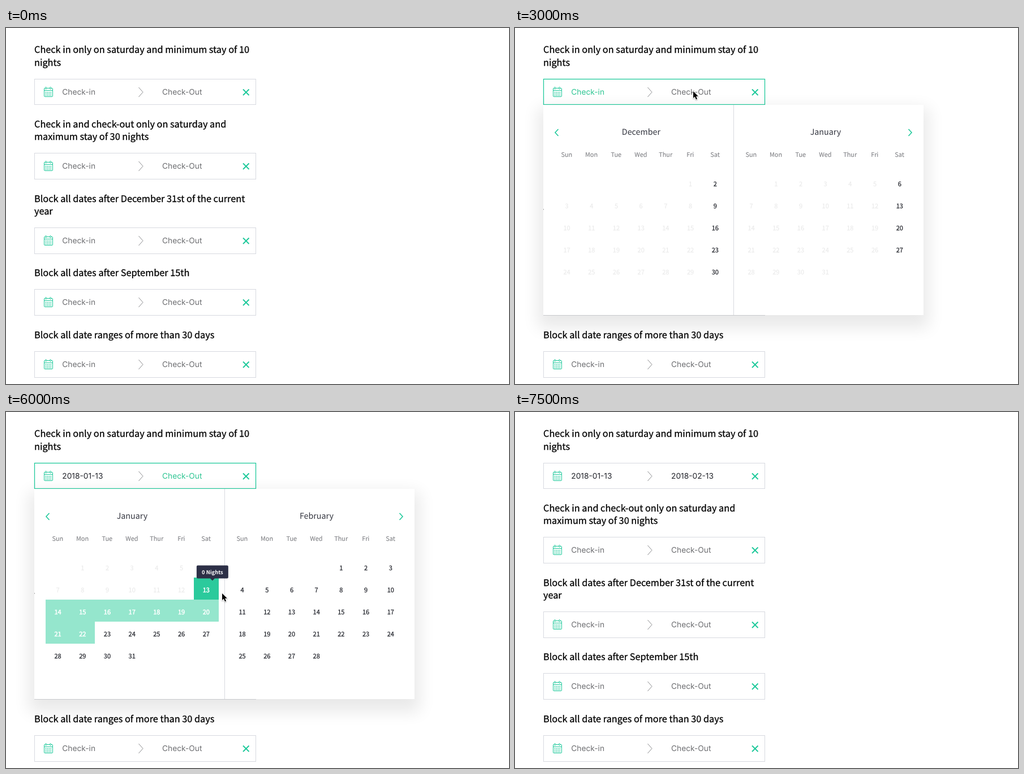
Write an HTML page with a canvas that moves like this. It is 889 px wide and 630 px high and loops after 9 s.

```html
<!DOCTYPE html>
<html lang="en">
<head>
<meta charset="utf-8">
<title>Date range picker</title>
<style>
  html, body { margin: 0; width: 100%; height: 100%; overflow: hidden; background: #fff; }
  canvas { display: block; }
</style>
</head>
<body>
<canvas id="stage" width="889" height="630"></canvas>
<script>
const ctx = document.getElementById('stage').getContext('2d');
ctx.textRendering = 'geometricPrecision';

const LOOP = 9000;
const OPEN = 3000, NEXT_MONTH = 4250, PICK_IN = 5500, HOVER_12 = 6250, HOVER_13 = 6500, CLOSE = 7250, CURSOR_END = 7500;

const SANS = '"Noto Sans CJK JP", "Noto Sans CJK SC", "Noto Sans CJK", "Open Sans", sans-serif';
const UI = 'Inter, Roboto, sans-serif';
const GREEN = '#1fc99b', GREEN_TEXT = '#2dc592', RANGE = '#95e6cd', SELECTED = '#2bca9c';
const INK = '#23252c', NAVY = '#2d3047', LINE = '#d7d9e0', GREY = '#6c6d70', FAINT = '#ebebeb';

const FIELDS = [
  { top: 90, title: ['Check in only on saturday and minimum stay of 10', 'nights'] },
  { top: 221, title: ['Check in and check-out only on saturday and', 'maximum stay of 30 nights'] },
  { top: 353, title: ['Block all dates after December 31st of the current', 'year'] },
  { top: 462, title: ['Block all dates after September 15th'] },
  { top: 572, title: ['Block all date ranges of more than 30 days'] }
];

const WEEKDAYS = ['Sun', 'Mon', 'Tue', 'Wed', 'Thur', 'Fri', 'Sat'];
// first: weekday of day 1, base: day count since the start of January
const DEC = { name: 'December', first: 5, days: 31, base: -31 };
const JAN = { name: 'January', first: 1, days: 31, base: 0 };
const FEB = { name: 'February', first: 4, days: 28, base: 31 };
const CHECK_IN = 13, MIN_STAY = 10;
const CELL_W = 43.7, CELL_H = 39, GRID_TOP = 254;

// [time, x, y] of the pointer tip
const POINTER = [
  [1250, 413, 49], [1500, 378, 134], [1750, 377, 183], [2250, 371, 180],
  [2500, 320, 114], [2750, 315, 112], [3250, 380, 124], [3500, 650, 184],
  [3750, 693, 186], [4000, 696, 185], [4500, 574, 229], [4750, 401, 281],
  [5000, 347, 299], [5250, 347, 316], [6000, 382, 321], [6250, 465, 349],
  [6500, 488, 346], [7250, 482, 346]
];

function text(str, x, y, size, color, { align = 'left', font = SANS, weight = 400, heavy = 0 } = {}) {
  ctx.font = `${weight} ${size}px ${font}`;
  ctx.textAlign = align;
  ctx.fillStyle = color;
  ctx.fillText(str, x, y);
  if (heavy) {
    ctx.strokeStyle = color;
    ctx.lineWidth = heavy;
    ctx.strokeText(str, x, y);
  }
}

function line(points, color, width) {
  ctx.beginPath();
  points.forEach(([x, y]) => ctx.lineTo(x, y));
  ctx.strokeStyle = color;
  ctx.lineWidth = width;
  ctx.stroke();
}

function box(x, y, w, h, color) {
  ctx.fillStyle = color;
  ctx.fillRect(x, y, w, h);
}

function calendarIcon(x, y) {
  ctx.strokeStyle = GREEN;
  ctx.lineWidth = 1;
  ctx.beginPath();
  ctx.roundRect(x + .5, y + 2.5, 15, 15, 1.5);
  ctx.stroke();
  line([[x, y + 6.5], [x + 16, y + 6.5]], GREEN, 1);
  for (const dx of [3, 11]) {
    box(x + dx, y + 1, 2, 3, '#fff');
    ctx.beginPath();
    ctx.roundRect(x + dx - .5, y + .5, 2, 3.5, 1);
    ctx.stroke();
  }
  for (let r = 0; r < 3; r++)
    for (let c = 0; c < 4; c++) box(x + 2.5 + c * 3, y + 9 + r * 2.8, 1.7, 1.4, GREEN);
}

function field({ top, title }, i, t) {
  const open = i === 0 && t >= OPEN && t < CLOSE;
  const hasIn = i === 0 && t >= PICK_IN, hasOut = i === 0 && t >= CLOSE;
  title.forEach((s, n) =>
    text(s, 50, top - 24 + (n + 1 - title.length) * 22.4 + (top < 100 ? .5 : 1), 16.3, '#000', { heavy: .3 }));

  const mid = top + 23;
  ctx.strokeStyle = open ? GREEN : LINE;
  ctx.lineWidth = open ? 1.3 : 1;
  ctx.strokeRect(50.5, top + .5, 391, i ? 46 : 45);
  calendarIcon(67, top + 14);
  const label = (s, x, color) => text(s, x, top + 28, 13.75, color, { font: UI });
  label(hasIn ? '2018-01-13' : 'Check-in', 99.3, hasIn ? INK : open ? GREEN_TEXT : GREY);
  label(hasOut ? '2018-02-13' : 'Check-Out', 276, hasOut ? INK : open && hasIn ? GREEN_TEXT : GREY);
  line([[234.5, mid - 8], [242, mid + .5], [234.5, mid + 9]], '#8c8d90', 1);
  line([[419, mid - 4.5], [429.5, mid + 6]], GREEN, 2);
  line([[429.5, mid - 4.5], [419, mid + 6]], GREEN, 2);
}

function cellPos(month, left, day) {
  const i = month.first + day - 1;
  return [left + (i % 7) * CELL_W, GRID_TOP + Math.floor(i / 7) * CELL_H];
}

function tooltip(cx, cellTop, nights) {
  const w = nights > 9 ? 61 : 56, y = cellTop - 21.5;
  ctx.fillStyle = NAVY;
  ctx.beginPath();
  ctx.roundRect(cx - w / 2, y, w, 23, 2);
  ctx.moveTo(cx - 4, y + 23);
  ctx.lineTo(cx, y + 27);
  ctx.lineTo(cx + 4, y + 23);
  ctx.fill();
  text(nights + ' Nights', cx, y + 15.3, 9.4, '#fff', { align: 'center', weight: 700 });
}

function monthGrid(month, left, hover, end) {
  const picked = end > 0;
  text(month.name, left + 3.5 * CELL_W, 189, 14.3, '#33353f', { align: 'center' });
  WEEKDAYS.forEach((d, i) =>
    text(d, left + (i + .5) * CELL_W - .5, 228, 10.9, '#85868a', { align: 'center', heavy: .15 }));

  for (let d = 1; d <= month.days; d++) {
    const n = month.base + d;
    const [x, y] = cellPos(month, left, d);
    const saturday = (month.first + d - 1) % 7 === 6;
    let color = (picked ? n > CHECK_IN : saturday) ? INK : FAINT, heavy = .25;
    if (picked && n === hover) {
      color = GREEN_TEXT;
      heavy = .5;
    } else if (picked && n >= CHECK_IN && n <= end) {
      const x0 = Math.round(x), y0 = Math.round(y);
      box(x0, y0, Math.round(x + CELL_W) - x0, CELL_H, n === CHECK_IN ? SELECTED : RANGE);
      color = '#fff';
      heavy = .5;
    }
    if (n === hover) continue;
    text(d, x + CELL_W / 2 - .3, y + 25.5, 11, color, { align: 'center', heavy });
  }
}

function hoverCell(month, left, day) {
  const [x, y] = cellPos(month, left, day);
  ctx.save();
  ctx.shadowColor = 'rgba(0,0,0,.35)';
  ctx.shadowBlur = 9;
  ctx.shadowOffsetY = 1;
  box(Math.round(x), y, 44, CELL_H, '#fff');
  ctx.restore();
  text(day, x + CELL_W / 2 - .3, y + 25.5, 11, GREEN_TEXT, { align: 'center', heavy: .5 });
  tooltip(x + CELL_W / 2 + 13, y, month.base + day - CHECK_IN);
}

function panel(t) {
  // shadow only: the caster sits off the stage
  ctx.save();
  ctx.shadowColor = 'rgba(0,0,0,.09)';
  ctx.shadowBlur = 27;
  ctx.shadowOffsetX = 2000;
  ctx.shadowOffsetY = 13.5;
  box(50 - 9 - 2000, 136 - 9, 672 + 18, 372 + 18, '#000');
  ctx.restore();
  box(50, 136, 672, 372, '#fff');
  box(50, 320, 1, 2, '#aaa');
  box(50, 508, 392, 1, '#c8c9cc');
  box(386, 136, 1, 372, LINE);
  line([[76.5, 179], [71, 185], [76.5, 191]], GREEN, 1.6);
  line([[695.5, 179], [701, 185], [695.5, 191]], GREEN, 1.6);

  const moved = t >= NEXT_MONTH;
  const hover = t >= HOVER_13 ? 44 : t >= HOVER_12 ? 43 : 0;
  const end = t < PICK_IN ? 0 : hover || CHECK_IN + MIN_STAY - 1;
  const L = 70, R = 396;
  monthGrid(moved ? JAN : DEC, L, hover, end);
  monthGrid(moved ? FEB : JAN, R, hover, end);
  if (hover) {
    hoverCell(FEB, R, hover - FEB.base);
  } else if (end) {
    const [x, y] = cellPos(JAN, L, CHECK_IN);
    tooltip(x + CELL_W / 2 + 10.8, y, 0);
  }
}

function pointer(t) {
  if (t >= CURSOR_END) return;
  const stop = POINTER.filter(p => p[0] <= t).pop();
  if (!stop) return;
  ctx.save();
  ctx.translate(stop[1], stop[2]);
  ctx.beginPath();
  [[0, 0], [0, 12], [2.8, 9.5], [5, 14.4], [7, 13.5], [5, 8.8], [8.8, 8.8]]
    .forEach(([x, y]) => ctx.lineTo(x, y));
  ctx.closePath();
  ctx.lineJoin = 'round';
  ctx.strokeStyle = '#fff';
  ctx.lineWidth = 2;
  ctx.shadowColor = 'rgba(0,0,0,.3)';
  ctx.shadowBlur = 2;
  ctx.shadowOffsetY = 1;
  ctx.stroke();
  ctx.shadowColor = 'transparent';
  ctx.fillStyle = '#000';
  ctx.fill();
  ctx.restore();
}

function draw(t) {
  box(0, 0, 889, 630, '#fff');
  FIELDS.forEach((f, i) => field(f, i, t));
  if (t >= OPEN && t < CLOSE) panel(t);
  pointer(t);
}

const start = performance.now();
function tick() {
  draw((performance.now() - start) % LOOP);
  requestAnimationFrame(tick);
}
tick();
</script>
</body>
</html>
```
